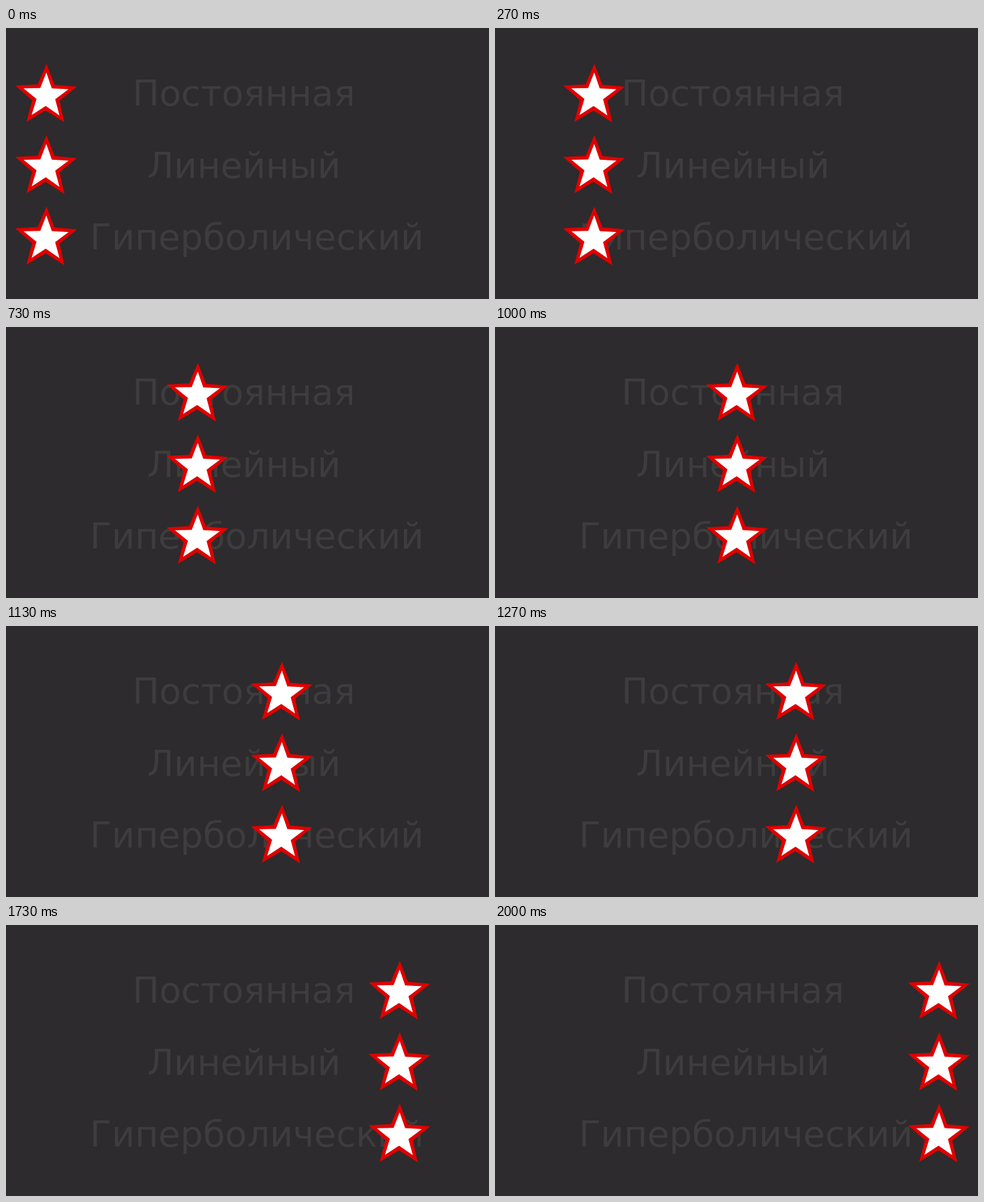
Recreate the animation shown at these times as an HTML page. Size 720 by 405 pixels, loop 2070 ms.

```html
<!DOCTYPE html>
<html lang="ru">
<head>
<meta charset="utf-8">
<style>
  html, body { margin: 0; width: 100%; height: 100%; overflow: hidden; background: #2d2b2d; }
  svg { display: block; width: 720px; height: 405px; }
  text { font: 53.3px "DejaVu Sans", sans-serif; fill: #3d3d3d; text-anchor: middle; }
</style>
</head>
<body>
<svg viewBox="0 0 720 405">
  <defs>
    <g id="star">
      <path id="rim" fill="#df0000"/>
      <path id="core" fill="#fff"/>
    </g>
  </defs>
  <text x="354.5" y="116">Постоянная</text>
  <text x="354.5" y="223.5">Линейный</text>
  <text x="374" y="331">Гиперболический</text>
  <g id="stars">
    <use href="#star" y="101.8"/>
    <use href="#star" y="208.5"/>
    <use href="#star" y="315.2"/>
  </g>
</svg>
<script>
  const LOOP = 2070, START_X = 59.5, STEP_X = 12.54;
  const byId = id => document.getElementById(id);

  function starPath(outer, inner, tilt) {
    const points = Array.from({ length: 10 }, (_, i) => {
      const radius = i % 2 ? inner : outer;
      const angle = (i * 36 - 90 + tilt) * Math.PI / 180;
      return (radius * Math.cos(angle)).toFixed(2) + ' ' + (radius * Math.sin(angle)).toFixed(2);
    });
    return 'M' + points.join('L') + 'Z';
  }

  // Motion is keyed at 24 fps but shown at 15 fps, on a 10 ms clock.
  function draw(time) {
    const clock = Math.floor((time % LOOP) / 10) * 10;
    const shown = Math.floor((clock + 3.4) * 0.015);
    const key = Math.ceil(shown * 1.6 - 1e-6);
    byId('stars').setAttribute('transform', `translate(${START_X + key * STEP_X} 0)`);
  }

  byId('rim').setAttribute('d', starPath(48.2, 21.5, 1));
  byId('core').setAttribute('d', starPath(35.3, 14.6, 1));

  const begin = performance.now();
  function tick() {
    draw(performance.now() - begin);
    requestAnimationFrame(tick);
  }
  draw(0);
  requestAnimationFrame(tick);
</script>
</body>
</html>
```
